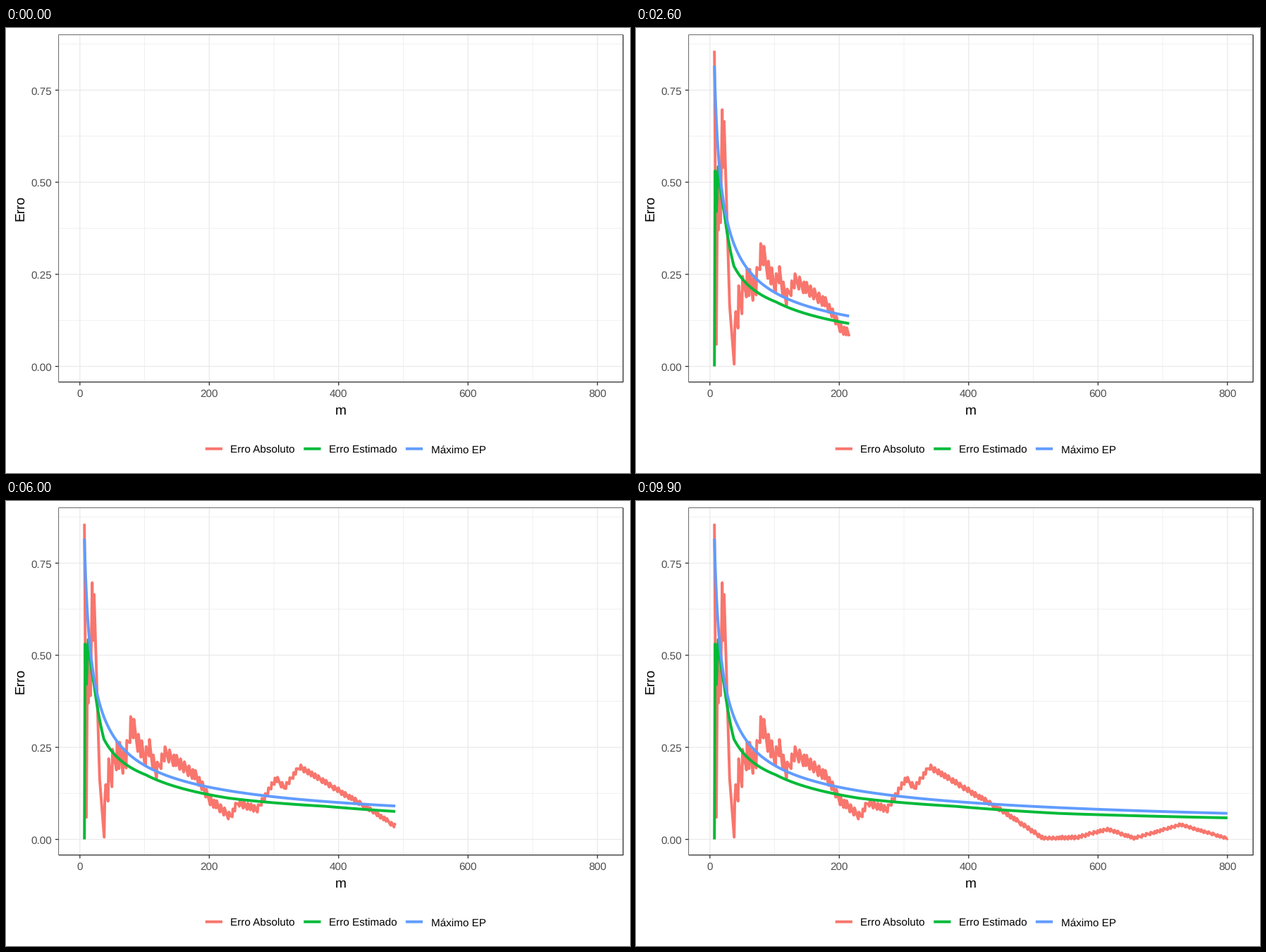
A matplotlib script for the animation above (10 s loop, 885 by 632 pixels).

```python
import numpy as np
import matplotlib.pyplot as plt
from matplotlib.animation import FuncAnimation

W, H, DPI = 885, 632, 100
FRAMES, INTERVAL = 100, 100
M0, M1 = 7, 800
RED, GREEN, BLUE = "#F8766D", "#00BA38", "#619CFF"
GRID, DARK, TICK_TEXT = "#EBEBEB", "#333333", "#4D4D4D"
LEFT, RIGHT, TOP, BOTTOM = 74.7, 875.2, 9.7, 502.8
TEXT, TITLE = 15.2, 19.2

plt.rcParams.update({"font.family": "Liberation Sans", "text.hinting": "none",
                     "path.simplify": False})


def px(m):
    return 104.8 + 0.9175 * np.asarray(m)


def py(v):
    return 480.6 - 523.1 * np.asarray(v)


def pt(size):
    return size * 72 / DPI


def absolute_error(settle=37.5):
    """Error of a running mean: a slow drift plus jumps that decay as 1/m."""
    start = [(7, .857), (10, .06), (12, .53), (13, .37), (15, .52), (16.5, .39),
             (19, .697), (20.5, .54), (22, .665), (30.5, .165), (settle, .006)]
    drift = [(40, .13), (56, .235), (70, .21), (80, .315), (100, .22),
             (107, .25), (118, .185), (132, .235), (180, .17), (202, .105),
             (232, .063), (245, .1), (274, .082), (303, .165), (316, .14),
             (340, .197), (410, .122), (450, .08), (516, .002), (568, .006),
             (615, .028), (656, .003), (727, .04), (M1, .003)]
    key_m, key_err = np.transpose(start + drift)
    m = np.union1d(key_m, np.arange(settle, M1))
    gaps = np.random.default_rng(4).uniform(4, 7, 160)
    jumps = settle + np.append(0, np.cumsum(gaps))
    phase = np.interp(m, jumps, np.arange(jumps.size))
    saw = np.where((m > settle) & (m < M1), 0.5 - phase % 1, 0)
    return m, np.abs(np.interp(m, key_m, key_err) + gaps.mean() / m * saw)


def estimated_error():
    """Sampling error s / sqrt(m), with a spread s that settles slowly."""
    spread = [(7, 0), (8, 1.5), (10, 1.33), (13, 1.957), (22, 1.97), (37, 1.66),
              (102, 1.77), (230, 1.7), (380, 1.75), (540, 1.64), (M1, 1.655)]
    m = np.arange(M0, M1 + 1)
    return m, np.interp(m, *np.transpose(spread)) / np.sqrt(m)


def maximum_error():
    m = np.arange(M0, M1 + 1)
    return m, 2 / np.sqrt(m - 1)


SERIES = [
    ("Erro Absoluto", RED, 282.7, absolute_error()),
    ("Erro Estimado", GREEN, 422.3, estimated_error()),
    ("Máximo EP", BLUE, 566.9, maximum_error()),
]

fig = plt.figure(figsize=(W / DPI, H / DPI), dpi=DPI, facecolor="white")
ax = fig.add_axes([0, 0, 1, 1])
ax.set(xlim=(0, W), ylim=(H, 0))
ax.axis("off")


def seg(x, y, color, width, z=1):
    line, = ax.plot(x, y, color=color, lw=pt(width), zorder=z, snap=False,
                    solid_capstyle="butt", solid_joinstyle="round")
    return line


def label(x, y, s, size=TEXT, color="black", **kw):
    ax.text(x, y, s, fontsize=pt(size), color=color, va="baseline", **kw)


def grid(xs, ys, width, z):
    for m in xs:
        seg([px(m)] * 2, [TOP, BOTTOM], GRID, width, z)
    for v in ys:
        seg([LEFT, RIGHT], [py(v)] * 2, GRID, width, z)


x_ticks, y_ticks = np.arange(0, 801, 200), np.arange(4) * 0.25
grid(x_ticks[:-1] + 100, y_ticks + 0.125, 0.7, 1)
grid(x_ticks, y_ticks, 1.32, 2)

# The border is thinner on its left and top sides
seg([LEFT, LEFT, RIGHT], [BOTTOM, TOP, TOP], DARK, 0.75, 6)
seg([LEFT, RIGHT, RIGHT], [BOTTOM, BOTTOM, TOP], DARK, 1.32, 6)

for m in x_ticks:
    seg([px(m)] * 2, [BOTTOM, BOTTOM + 4.8], DARK, 1.32)
    label(px(m) - 0.2, 524, f"{m}", color=TICK_TEXT, ha="center")
for v in y_ticks:
    seg([LEFT - 4.8, LEFT], [py(v)] * 2, DARK, 1.32)
    label(65.3, py(v) + 6.3, f"{v:.2f}", color=TICK_TEXT, ha="right")

label(474.5, 549, "m", TITLE, ha="center")
label(24.8, 255.8, "Erro", TITLE, ha="center", rotation=90, rotation_mode="anchor")

curves = []
for name, color, key_x, data in SERIES:
    seg([key_x, key_x + 24.2], [597.6] * 2, color, 3.95)
    label(key_x + 35.8, 603.6, name)
    curves.append((seg([], [], color, 3.95, 4), *data))


def update(i):
    end = M0 + (M1 - M0) * i / (FRAMES - 1)
    for line, m, v in curves:
        shown = m < end
        xs = np.append(m[shown], end)
        ys = np.append(v[shown], np.interp(end, m, v))
        line.set_data(px(xs), py(ys))
        line.set_visible(i > 0)
    return [c[0] for c in curves]


anim = FuncAnimation(fig, update, frames=FRAMES, interval=INTERVAL,
                     init_func=lambda: update(0), repeat=True, repeat_delay=0)
plt.show()
```
